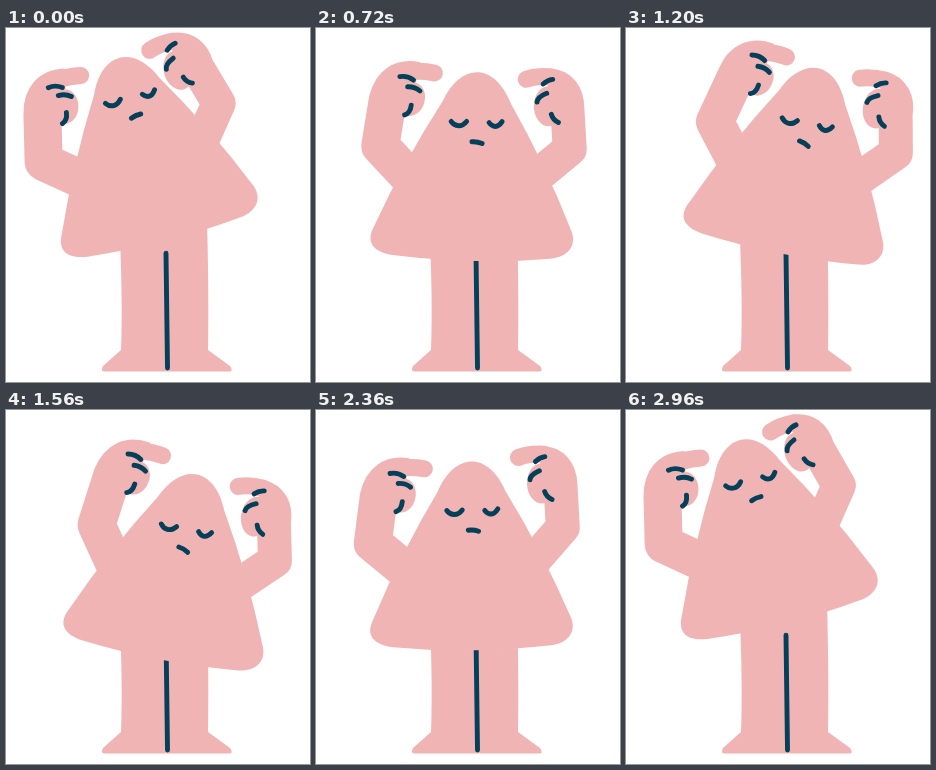
These frames come from a looping animation (304 px wide and 354 px high, 3000 ms). An HTML page:

```html
<!DOCTYPE html>
<html lang="en">
<head>
<meta charset="utf-8">
<title>Swaying figure</title>
<style>
  html, body { margin: 0; width: 100%; height: 100%; overflow: hidden; background: #fff; }
  svg { display: block; width: 304px; height: 354px; }
  .skin { fill: #f1b4b5; }
  .limb { fill: none; stroke: #f1b4b5; stroke-linejoin: round; }
  .finger { fill: none; stroke: #f1b4b5; stroke-width: 17; stroke-linecap: round; }
  .ink { fill: none; stroke: #04405a; stroke-width: 4.9; stroke-linecap: round; stroke-linejoin: round; }
</style>
</head>
<body>
<svg viewBox="0 0 304 354">
  <path class="skin" d="M113 190Q117 270 115 322L97 338Q94 343.5 99 343.5H223Q228 343.5 224 338L202 322Q203 270 201 190Z"/>
  <path class="ink" d="M160 225.3L161.5 340"/>
  <g id="body">
    <path class="skin" d="M-98 -20Q-70 -86 -34 -146C-17 -186 17 -186 34 -146Q70 -87 98 -22C106 -6 96 6 79 8Q0 17 -79 9.5C-97 7 -108 -1 -98 -20Z"/>
    <path id="leftArm" class="limb" stroke-width="38"/>
    <path id="rightArm" class="limb" stroke-width="34"/>
    <g id="leftHand">
      <ellipse class="skin" cx="-24" cy="31" rx="13" ry="17"/>
      <path class="finger" d="M-8.5 0Q-20 .5 -30 4"/>
      <path class="ink" d="M-41 12Q-34 9 -27 12M-31 20Q-24 18 -18 21M-23 37Q-22 45 -27 48"/>
    </g>
    <g id="rightHand">
      <ellipse class="skin" cx="37" cy="18" rx="14.5" ry="20" transform="rotate(-15.6 37 18)"/>
      <path class="finger" d="M8.5 -2Q18 -8.5 32 -11"/>
      <path class="ink" d="M26 -2Q29 -7 34 -9M25 17Q24 12 32 6M42 25Q45 30 51 31"/>
    </g>
    <g id="eyes" class="ink">
      <path d="M-25 0C-21 5.5 -14 5.5 -9.5 -.5"/>
      <path d="M13 0C17 5 22 5 26 -1.5"/>
    </g>
    <path id="mouth" class="ink" d="M-5 .3Q0 -1 5.3 .3"/>
  </g>
</svg>
<script>
  const LOOP = 3000, STEP = 40, REST = 13.6;
  const el = id => document.getElementById(id);
  const rad = deg => deg * Math.PI / 180;

  // Joint positions in body space: left elbow, left tip, right elbow, right tip
  const times = [0, 360, 720, 1200, 1880, 2360];
  const poses = [
    [-99, -93, -34, -166, 85, -108, 22, -176],
    [-96, -97, -35, -171, 92, -96, 24, -160],
    [-95, -99, -35, -172, 94.5, -102, 40, -170.5],
    [-90, -102.5, -25, -179, 93.5, -109, 34.5, -175],
    [-89, -108, -34.5, -188, 93.5, -105, 35, -171],
    [-99, -94.5, -39, -167, 91, -110, 38, -180]
  ];

  const count = times.length;
  const timeAt = i => times[(i + count) % count] + LOOP * Math.floor(i / count);
  const poseAt = i => poses[(i + count) % count];

  // Periodic cubic through the poses
  function poseFor(t) {
    let i = count - 1;
    while (times[i] > t) i--;
    const span = timeAt(i + 1) - timeAt(i);
    const u = (t - timeAt(i)) / span;
    const slope = (j, k) =>
      (poseAt(j + 1)[k] - poseAt(j - 1)[k]) / (timeAt(j + 1) - timeAt(j - 1)) * span;
    return poseAt(i).map((a, k) => {
      const b = poseAt(i + 1)[k], m = slope(i, k), n = slope(i + 1, k);
      return a + m * u + (3 * (b - a) - 2 * m - n) * u * u
        + (2 * (a - b) + m + n) * u * u * u;
    });
  }

  function drawArm(side, shoulder, elbow, tip, turn, bend) {
    const c = Math.cos(rad(turn)), s = Math.sin(rad(turn));
    const [wrist, control, end] = bend.map(([x, y]) =>
      [tip[0] + x * c - y * s, tip[1] + x * s + y * c]);
    el(side + 'Arm').setAttribute('d', `M${shoulder}L${elbow}L${wrist}Q${control} ${end}`);
    el(side + 'Hand').setAttribute('transform', `translate(${tip}) rotate(${turn})`);
  }

  function draw(t) {
    const phase = 2 * Math.PI * t / LOOP;
    const wave = n => Math.cos(n * phase);
    const lean = 0.388 * (4 - 32.5 * wave(1) - 5 * wave(2) - 2.2 * wave(4));
    const dip = 5 * Math.pow((1 - wave(1)) / 2, 20);
    const y = 217 - 16.5 * wave(3) + dip;
    el('body').setAttribute('transform', `translate(156 ${y}) rotate(${lean})`);
    el('eyes').setAttribute('transform', `translate(0 ${-127 + 0.58 * lean})`);
    el('mouth').setAttribute('transform',
      `translate(1.5 ${-107 + 0.62 * lean}) rotate(${6 + 1.2 * lean})`);

    const p = poseFor(t);
    drawArm('left', [-50, -54], p.slice(0, 2), p.slice(2, 4),
      REST - 0.08 * (lean + REST), [[-47, 38], [-47, 13], [-24, 12]]);
    drawArm('right', [50, -63], p.slice(4, 6), p.slice(6, 8),
      REST, [[56, 15.5], [50, -6], [31, -2]]);
  }

  function tick(now) {
    draw(Math.floor(now / STEP) * STEP % LOOP);
    requestAnimationFrame(tick);
  }
  draw(0);
  requestAnimationFrame(tick);
</script>
</body>
</html>
```
